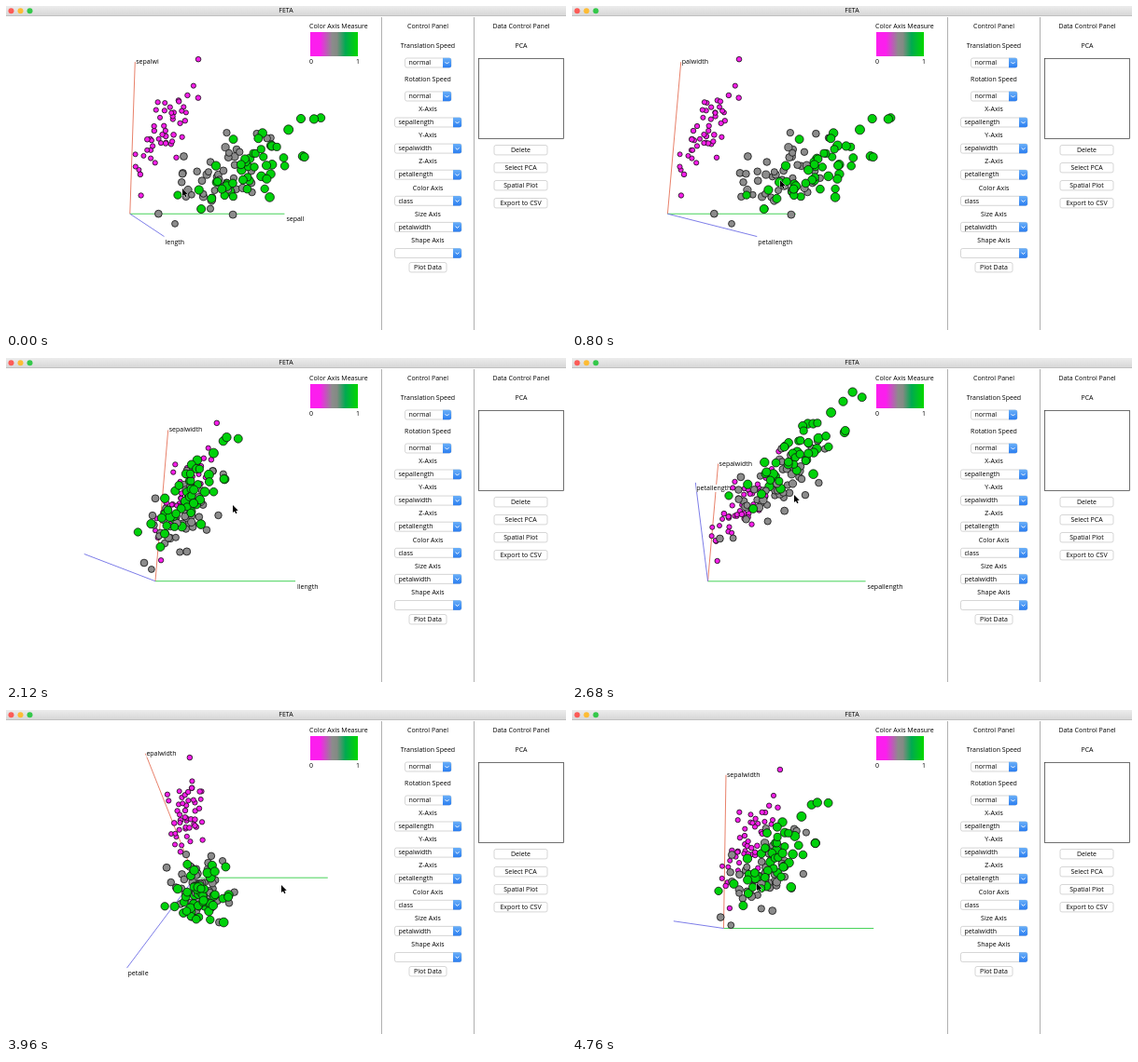
An HTML page with a canvas that plays this animation: 600 by 348 pixels, repeating every 4.8 s.

```html
<!DOCTYPE html>
<html lang="en">
<head>
<meta charset="utf-8">
<title>FETA</title>
<style>
  html, body { margin: 0; width: 100%; height: 100%; overflow: hidden; background: #fff; }
  svg, canvas { position: absolute; left: 0; top: 0; }
  svg text { font: 7px "Open Sans", "Noto Sans", sans-serif; fill: #000; }
</style>
</head>
<body>
<svg id="ui" width="600" height="348" viewBox="0 0 600 348"></svg>
<canvas id="plot" width="402" height="348"></canvas>
<script>
// ---- static window ----
const text = (x, y, s, anchor = 'middle') =>
  `<text x="${x}" y="${y + 2.2}" text-anchor="${anchor}">${s}</text>`;

const box = (x, y, w, h, r, fill, stroke) =>
  `<rect x="${x}" y="${y}" width="${w}" height="${h}" rx="${r}" fill="${fill}" stroke="${stroke}" stroke-width=".7"/>`;

const combo = (x, y, w, s) =>
  box(x, y - 5, w, 10, 2, '#fff', '#c4c4c4') +
  `<path d="M${x + w - 9} ${y - 5.2}h7q2 0 2 2v6.4q0 2-2 2h-7z" fill="url(#blue)"/>` +
  `<path d="M${x + w - 6.4} ${y - .8}l1.9 1.9l1.9-1.9" fill="none" stroke="#fff"/>` +
  text(x + 4, y, s, 'start');

const button = (cx, y, w, s) =>
  box(cx - w / 2, y - 5, w, 10.4, 2, '#fff', '#c4c4c4') + text(cx, y, s);

const stops = list => list.map(([o, c]) => `<stop offset="${o}" stop-color="${c}"/>`).join('');

const lights = ['#fc5b57', '#fdbc35', '#34c84a'];
const speeds = ['Translation Speed', 'Rotation Speed'];
const axes = [['X-Axis', 'sepallength'], ['Y-Axis', 'sepalwidth'], ['Z-Axis', 'petallength'],
  ['Color Axis', 'class'], ['Size Axis', 'petalwidth'], ['Shape Axis', '']];
const actions = ['Delete', 'Select PCA', 'Spatial Plot', 'Export to CSV'];

document.getElementById('ui').innerHTML = `
  <defs>
    <linearGradient id="bar" x2="0" y2="1">${stops([[0, '#ececec'], [1, '#d6d6d6']])}</linearGradient>
    <linearGradient id="blue" x2="0" y2="1">${stops([[0, '#6bb0f8'], [1, '#2a7df0']])}</linearGradient>
    <linearGradient id="scale">${stops([[.2, '#fc1eee'], [.46, '#8c8c8c'],
      [.56, '#848a84'], [.74, '#00aa50'], [1, '#00d800']])}</linearGradient>
  </defs>
  <rect width="600" height="10.5" fill="url(#bar)"/>
  <path d="M0 10.5H600" stroke="#c0c0c0"/>
  ${lights.map((c, i) => `<circle cx="${5.5 + i * 10}" cy="5.2" r="3" fill="${c}"/>`).join('')}
  ${text(300, 5.2, 'FETA')}
  <path d="M402.5 12V348M501.5 12V348" stroke="#b0b0b0"/>
  ${text(325, 22, 'Color Axis Measure', 'start')}
  <rect x="326" y="28" width="51" height="26" fill="url(#scale)"/>
  ${text(327, 60, '0')}${text(377, 60, '1')}
  ${text(452, 22, 'Control Panel')}
  ${speeds.map((s, i) => text(452, 43 + i * 36, s) + combo(427.5, 61 + i * 36, 49.5, 'normal')).join('')}
  ${axes.map(([s, v], i) => text(452, 111 + i * 28.1, s) + combo(416.5, 125 + i * 28.1, 71.5, v)).join('')}
  ${button(452, 280.5, 40, 'Plot Data')}
  ${text(552, 22, 'Data Control Panel')}${text(552, 43, 'PCA')}
  ${box(506.5, 56.5, 91, 86, 0, '#fff', '#333')}
  ${actions.map((s, i) => button(551.5, 154.5 + i * 19, 57, s)).join('')}`;

// ---- iris-like samples: sepal length, sepal width, petal length, petal width ----
let seed = 11;
const rand = () => {
  seed = (seed + 0x6D2B79F5) | 0;
  let v = Math.imul(seed ^ seed >>> 15, 1 | seed);
  v = v + Math.imul(v ^ v >>> 7, 61 | v) ^ v;
  return ((v ^ v >>> 14) >>> 0) / 4294967296;
};
const gauss = () => (rand() + rand() + rand() + rand() - 2) * 1.73;

// r and q tie sepal width and petal length to sepal length; edge holds the clear outliers
const classes = [
  { color: '#f81eea', mean: [5, 3.42, 1.46, .25], sd: [.33, .36, .17, .1], r: .74, q: .27,
    edge: [[5.7, 4.4, 1.5, .4], [4.5, 2.3, 1.3, .3]] },
  { color: '#8c8c8c', mean: [5.94, 2.77, 4.26, 1.33], sd: [.5, .3, .46, .19], r: .53, q: .75,
    edge: [[5, 2, 3.5, 1], [6.2, 2.2, 4.5, 1.5]] },
  { color: '#00d20a', mean: [6.5, 2.97, 5.5, 2.03], sd: [.56, .3, .5, .27], r: .46, q: .86,
    edge: [[7.9, 3.8, 6.4, 2], [7.7, 3.8, 6.7, 2.2], [7.2, 3.6, 6.1, 2.5], [4.9, 2.5, 4.5, 1.7]] }
];

const low = [4.3, 2, 1, .1], span = [3.6, 2.4, 5.9, 2.4];
const unit = row => row.map((v, i) => (v - low[i]) / span[i]);

const samples = classes.flatMap(({ color, mean, sd, r, q, edge }) => {
  const rows = edge.map(unit);
  while (rows.length < 50) {
    const a = gauss();
    const dev = [a, r * a + Math.sqrt(1 - r * r) * gauss(), q * a + Math.sqrt(1 - q * q) * gauss(), gauss()];
    const row = unit(dev.map((d, i) => mean[i] + sd[i] * d));
    if (row.every(v => v >= 0 && v <= 1)) rows.push(row);
  }
  return rows.map(([x, y, z, w]) => ({ x, y, z, radius: 2.5 + 2.5 * w, color }));
});

// ---- motion: dragging turns the plot; labels are often painted only in part ----
const LOOP = 4800, STEP = 40, SIZE = 170;
const NAMES = ['sepallength', 'sepalwidth', 'petallength'];
const poses = [
  { t: 0, yaw: 13, pitch: 8.5, mouse: [189, 196], names: ['sepall', 'sepalwi', 'length'] },
  { t: 580, yaw: 60, pitch: 8.5, mouse: [250, 190] },
  { t: 800, yaw: 36, pitch: 8.5, mouse: [223, 187], names: ['', 'palwidth', 'petallength'] },
  { t: 1360, yaw: -36, pitch: -5.4, mouse: [293, 177], names: ['sepallen', 'epalwidth', 'petallength'] },
  { t: 1700, yaw: -60, pitch: -8, mouse: [260, 170] },
  { t: 2120, yaw: -28, pitch: -10.2, mouse: [243, 158], names: ['llength', 'sepalwidth', ''] },
  { t: 2680, yaw: -6, pitch: -40, mouse: [238, 147] },
  { t: 3380, yaw: -32, pitch: 35, mouse: [280, 186] },
  { t: 3960, yaw: -33, pitch: 36, mouse: [295, 188], names: ['', 'epalwidth', 'petalle'] },
  { t: 4500, yaw: -82, pitch: 2, mouse: [220, 187] },
  { t: 4760, yaw: -19, pitch: -2.7, mouse: [198, 186], names: ['', 'sepalwidth', ''] }
];

function poseAt(t) {
  const i = Math.min(poses.length - 2, poses.findLastIndex(p => p.t <= t));
  const a = poses[i], b = poses[i + 1];
  const k = (t - a.t) / (b.t - a.t);
  const mix = (u, v) => u + (v - u) * k;
  return {
    yaw: mix(a.yaw, b.yaw) * Math.PI / 180,
    pitch: mix(a.pitch, b.pitch) * Math.PI / 180,
    mouse: a.mouse.map((v, j) => mix(v, b.mouse[j])),
    names: (k < 1 ? a : b).names || NAMES
  };
}

// tilt about the x axis, then turn about the screen's vertical, around a fixed pivot
function projector({ yaw, pitch }) {
  const cy = Math.cos(yaw), sy = Math.sin(yaw), cp = Math.cos(pitch), sp = Math.sin(pitch);
  return (x, y, z) => {
    x += .2; y -= .654; z -= .308;
    const up = y * cp - z * sp, near = y * sp + z * cp;
    return [115 + SIZE * (x * cy + near * sy), 121 - SIZE * up, near * cy - x * sy];
  };
}

// ---- drawing ----
const g = document.getElementById('plot').getContext('2d');

function line([x1, y1], [x2, y2], color) {
  g.strokeStyle = color;
  g.lineWidth = .9;
  g.beginPath();
  g.moveTo(x1, y1);
  g.lineTo(x2, y2);
  g.stroke();
}

function label(s, x, y) {
  g.fillStyle = '#fff';
  g.fillRect(x, y - 6, g.measureText(s).width, 8);
  g.fillStyle = '#000';
  g.fillText(s, x, y);
}

function ball([x, y], r, color) {
  g.beginPath();
  g.arc(x, y, r, 0, 7);
  g.fillStyle = color;
  g.fill();
  g.strokeStyle = '#111';
  g.lineWidth = .8;
  g.stroke();
}

const arrowShape = new Path2D('M0 0V8L1.9 6.4L3.2 9.2L4.5 8.6L3.3 5.9L5.7 5.7Z');
function arrow(x, y) {
  g.save();
  g.translate(x, y);
  g.strokeStyle = '#fff';
  g.lineWidth = 1;
  g.stroke(arrowShape);
  g.fillStyle = '#000';
  g.fill(arrowShape);
  g.restore();
}

function draw(t) {
  const pose = poseAt(t), project = projector(pose);
  const origin = project(0, 0, 0);
  const tips = [project(1, 0, 0), project(0, .97, 0), project(0, 0, .97)];
  const offsets = [[2, 8], [1, 2], [1, 8]];

  g.clearRect(0, 0, 402, 348);
  g.font = '7px "Open Sans", "Noto Sans", sans-serif';
  ['#32cd46', '#e6735a', '#6f6fe6'].forEach((c, i) => line(origin, tips[i], c));
  pose.names.forEach((s, i) => label(s, tips[i][0] + offsets[i][0], tips[i][1] + offsets[i][1]));

  // far samples first
  samples
    .map(s => ({ s, p: project(s.x, s.y, s.z) }))
    .sort((a, b) => a.p[2] - b.p[2])
    .forEach(({ s, p }) => ball(p, s.radius, s.color));

  arrow(...pose.mouse);
}

const start = performance.now();
function tick() {
  const t = (performance.now() - start) % LOOP;
  draw(Math.floor(t / STEP) * STEP);
  requestAnimationFrame(tick);
}
tick();
</script>
</body>
</html>
```
